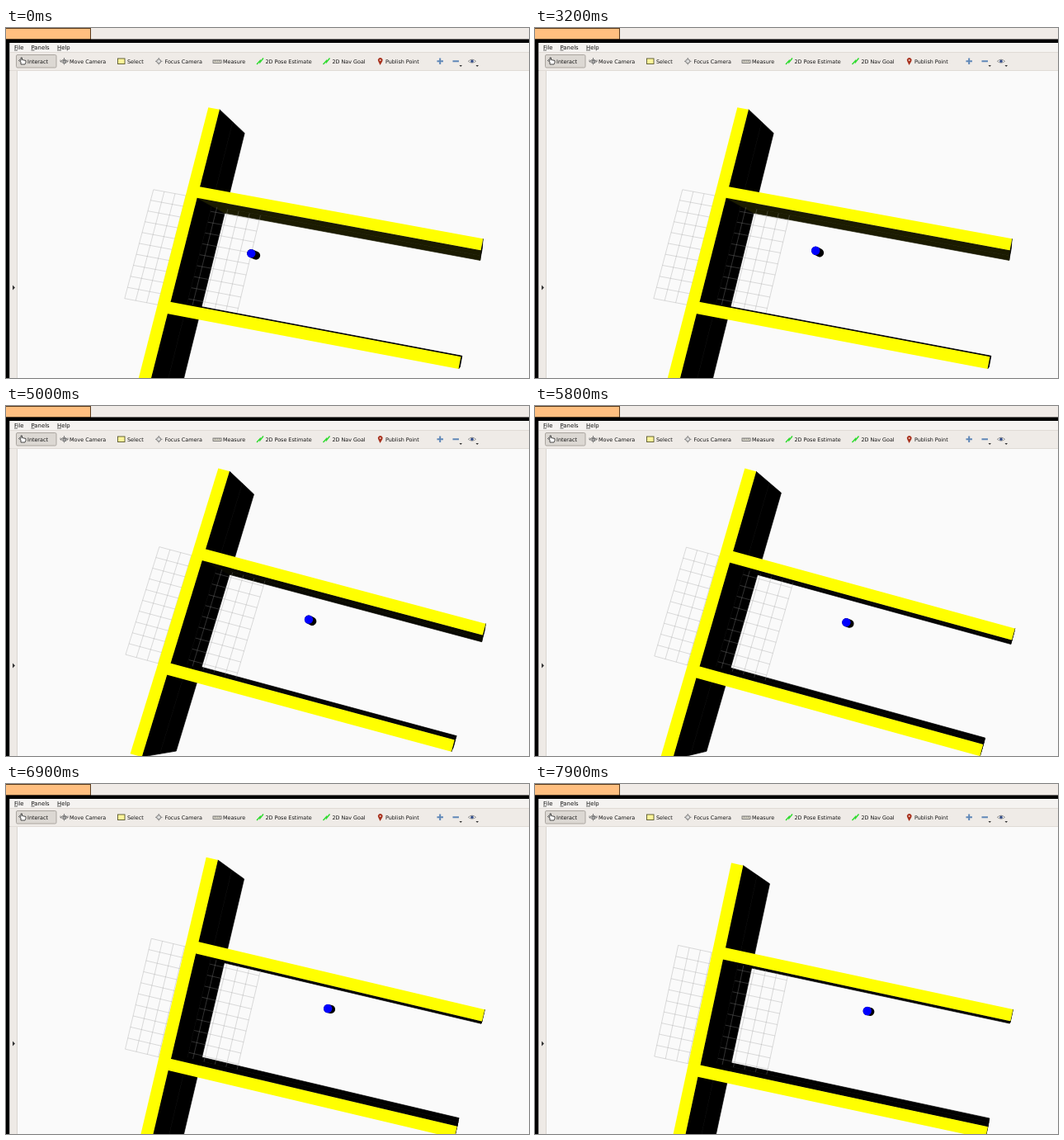
An HTML page with a canvas for the animation above (8 s loop, 634 px wide and 424 px high).

```html
<!DOCTYPE html>
<html lang="en">
<head>
<meta charset="utf-8">
<title>Robot view</title>
<style>
html, body { margin: 0; width: 634px; height: 424px; overflow: hidden; background: #fafafa; }
canvas, svg { position: absolute; left: 0; top: 0; display: block; }
text { font-family: "DejaVu Sans", sans-serif; font-size: 6.4px; fill: #111; }
.menu text { font-size: 6.9px; }
</style>
</head>
<body>
<canvas id="view" width="634" height="424"></canvas>
<svg width="634" height="424" viewBox="0 0 634 424">
  <rect width="634" height="14" fill="#f0ebe7"/>
  <rect x="-1" y=".5" width="103.5" height="13.5" fill="#ffbf80" stroke="#5a3a1c"/>
  <path d="M0 13.5H634V18H4.500V424H0Z"/>
  <rect x="4.500" y="18" width="630" height="11" fill="#f5f3f1"/>
  <rect x="4.500" y="29" width="630" height="22.500" fill="#efebe7"/>
  <path d="M5 29.500H634M5 51.500H634" stroke="#e0dbd6"/>
  <rect x="4.500" y="52" width="9.500" height="372" fill="#eeeae6"/>
  <path d="M13.500 52V424" stroke="#dad5d0"/>
  <path d="M8 311.500L11 314.500L8 317.500Z" fill="#333"/>
  <g class="menu">
    <text x="10" y="25.500">File</text><text x="30.500" y="25.500">Panels</text><text x="62" y="25.500">Help</text>
    <path d="M10 27H14M30.500 27H34.500M62 27H67" stroke="#222" stroke-width=".7"/>
  </g>
  <rect x="12.500" y="32.500" width="48.500" height="15.500" rx="1.500" fill="#dcd8d3" stroke="#aaa59f"/>
  <g id="labels"></g>
  <path d="M18 44V41L15.500 39.500L16.500 38.500L18 39.500V36H19.500V38.500L24 39.500V42L23 44Z" fill="#fff" stroke="#222" stroke-width=".8"/>
  <g fill="none" stroke="#777" stroke-width=".9">
    <path d="M66 41Q70.500 35 75 41M66 38.500V41H68.500M75 38.500V41H72.500M70.500 36V44.500"/>
    <rect x="69" y="39.500" width="3.500" height="3" fill="#aaa"/>
    <path d="M181 40.300H189.500M185.200 36V44.500"/>
    <circle cx="185.200" cy="40.300" r="2.500" fill="#ddd"/>
  </g>
  <rect x="135.500" y="37" width="8.500" height="6.500" fill="#fff59a" stroke="#55552a" stroke-width=".9"/>
  <rect x="251" y="39" width="10" height="3.500" fill="#d9d6c8" stroke="#666" stroke-width=".8"/>
  <path d="M253.500 39V41M256 39V41M258.500 39V41" stroke="#666" stroke-width=".6"/>
  <path d="M304 44L308 39.500V41.500L312 36.500M384.500 44L388.500 39.500V41.500L392.500 36.500" fill="none" stroke="#2edb2e" stroke-width="1.400"/>
  <path d="M453.500 45L451.300 40.500A2.900 2.900 0 1 1 456.200 40.500Z" fill="#a8321e"/>
  <circle cx="453.700" cy="39" r="1" fill="#eed0c8"/>
  <path d="M522.500 40.300H530M526.200 36.500V44M541.500 40.300H549" stroke="#6088b8" stroke-width="2"/>
  <path d="M560.500 40.300Q565 36 569.500 40.300Q565 44 560.500 40.300Z" fill="#fff" stroke="#777" stroke-width=".8"/>
  <circle cx="565" cy="40.200" r="1.800" fill="#364f8a"/>
  <path d="M549.500 45H553L551.200 47ZM569.500 45H573L571.200 47Z" fill="#333"/>
</svg>
<script>
const LOOP = 8000, STEP = 100;
const ctx = document.getElementById('view').getContext('2d');

const labels = [['Interact', 26], ['Move Camera', 77], ['Select', 147], ['Focus Camera', 192.5],
  ['Measure', 263], ['2D Pose Estimate', 314.5], ['2D Nav Goal', 395.5], ['Publish Point', 460]];
document.getElementById('labels').innerHTML =
  labels.map(([s, x]) => `<text x="${x}" y="42.5">${s}</text>`).join('');

// World in metres: x along the corridor, y across it, z up; walls are centred on z = 0.
const WALL_HALF = 12.5, LENGTH = 25, THICK = 0.5, CORRIDOR = 5, HEIGHT = 2.5;
const FOCUS = { x: 24.7, y: -2.48, z: -8.26 };
const CENTRE = { x: 566, y: 315 }, FOCAL = 635, DISTANCE = 54.4;

// orbit camera: time, turn and tilt from straight down, in degrees
const orbit = [
  [4500, 10.6, 6.65],
  [5000, 15, 3.8],
  [6400, 15.6, 0],
  [6900, 13.3, 0],
  [7900, 12.1, 0]
];

function cameraAt(t) {
  const i = orbit.findIndex(k => k[0] > t);
  const a = orbit[i < 0 ? orbit.length - 1 : Math.max(0, i - 1)];
  const b = i < 0 ? a : orbit[i];
  const k = a === b ? 0 : (t - a[0]) / (b[0] - a[0]);
  const [turn, tilt] = [1, 2].map(n => a[n] + (b[n] - a[n]) * k);
  return { turn, tilt };
}

function projector({ turn, tilt }) {
  const rad = Math.PI / 180;
  const ct = Math.cos(turn * rad), st = Math.sin(turn * rad);
  const cp = Math.cos(tilt * rad), sp = Math.sin(tilt * rad);
  return (x, y, z) => {
    const dx = x - FOCUS.x, dy = y - FOCUS.y, dz = z - FOCUS.z;
    const right = dx * ct - dy * st, down = dx * st + dy * ct;
    const scale = FOCAL / (DISTANCE - dz * cp - down * sp);
    return [CENTRE.x + right * scale, CENTRE.y + (down * cp - dz * sp) * scale, scale];
  };
}

function trace(pts) {
  ctx.beginPath();
  pts.forEach(([x, y]) => ctx.lineTo(x, y));
}
function fill(color, pts) {
  trace(pts);
  ctx.closePath();
  ctx.fillStyle = color;
  ctx.fill();
}
function line(color, width, ...pts) {
  trace(pts);
  ctx.strokeStyle = color;
  ctx.lineWidth = width;
  ctx.stroke();
}

function drawSides(project, z0, z1, lit) {
  const side = (color, x0, y0, x1, y1) => {
    const pts = [project(x0, y0, z0), project(x1, y1, z0), project(x1, y1, z1), project(x0, y0, z1)];
    fill(color, pts);
    line(color, 0.7, ...pts, pts[0]);
  };
  side('#000', THICK, -WALL_HALF, THICK, WALL_HALF);
  for (const s of [-1, 1]) {
    const inner = s * (CORRIDOR - THICK);
    side('#000', LENGTH, inner, LENGTH, s * (CORRIDOR + THICK));
    side(s < 0 ? lit : '#000', THICK, inner, LENGTH, inner);
  }
}

function drawTops(project) {
  const top = (x0, x1, y0, y1) => fill('#ffff00',
    [[x0, y0], [x1, y0], [x1, y1], [x0, y1]].map(([x, y]) => project(x, y, HEIGHT)));
  top(-THICK, THICK, -WALL_HALF, WALL_HALF);
  for (const y of [-CORRIDOR, CORRIDOR]) top(0, LENGTH, y - THICK, y + THICK);
}

function drawGrid(project) {
  for (let i = -5; i <= 5; i++) {
    line('rgba(150,150,150,.42)', 0.8, project(i, -5, 0), project(i, 5, 0));
    line('rgba(150,150,150,.42)', 0.8, project(-5, i, 0), project(5, i, 0));
  }
}

function drawRobot(project, seconds) {
  const x = 5.45 + 0.925 * seconds, y = -0.85 - 0.25 * seconds;
  const foot = project(x, y, 0), head = project(x, y, 1);
  ctx.lineCap = 'round';
  line('#000', 10.2, foot, head);
  ctx.lineCap = 'butt';
  ctx.beginPath();
  ctx.arc(head[0], head[1], 0.37 * head[2], 0, 7);
  ctx.fillStyle = '#0000ff';
  ctx.fill();
}

function draw(t) {
  const camera = cameraAt(t), project = projector(camera);
  const s = Math.round(0.6 * camera.tilt ** 2), lit = `rgb(${s},${s},0)`;
  ctx.fillStyle = '#fafafa';
  ctx.fillRect(0, 0, 634, 424);
  // the grid cuts the walls at half height
  drawSides(project, -HEIGHT, 0, lit);
  drawGrid(project);
  drawSides(project, 0, HEIGHT, lit);
  drawTops(project);
  drawRobot(project, t / 1000);
}

const begin = performance.now();
function tick() {
  const t = Math.max(0, performance.now() - begin) % LOOP;
  draw(Math.floor(t / STEP) * STEP);
  requestAnimationFrame(tick);
}
tick();
</script>
</body>
</html>
```
